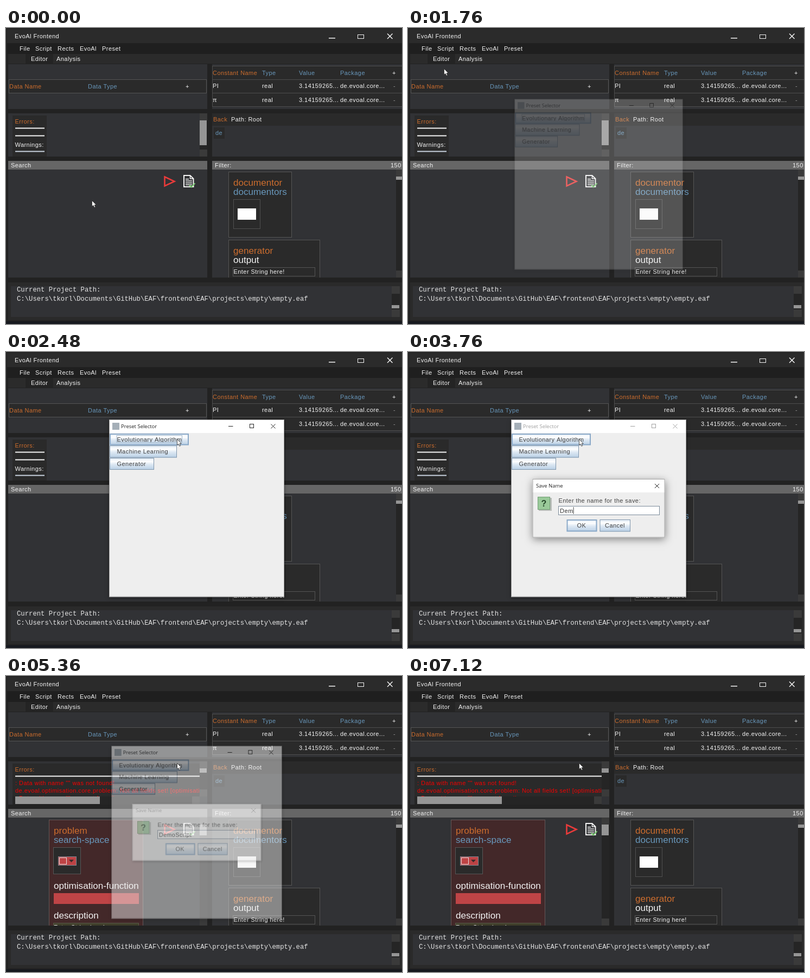
An HTML page with a canvas that plays this animation: 730 px wide and 548 px high, repeating every 7200 ms.

```html
<!DOCTYPE html>
<html lang="en">
<head>
<meta charset="utf-8">
<title>Preset workflow</title>
<style>
html, body { margin: 0; width: 100%; height: 100%; overflow: hidden; background: #232323; }
canvas { display: block; }
</style>
</head>
<body>
<canvas id="stage" width="730" height="548"></canvas>
<script>
const W = 730, H = 548, LOOP = 7200, STEP = 80;
const screen = document.getElementById('stage').getContext('2d');
const layer = document.createElement('canvas');
layer.width = W;
layer.height = H;
const layerCtx = layer.getContext('2d');
let c = screen;

const UI = '11px "Liberation Sans", Arial, sans-serif';
const BIG = '17.1px "Liberation Sans", Arial, sans-serif';
const MONO = '12.26px "Liberation Mono", monospace';
const CAPTION = '9.5px "Open Sans", sans-serif';
const PANEL = '#313235', DARK = '#2a2a2a', GAP = '#222222', EDGE = '#555555';
const ORANGE = '#cc6d2e', BLUE = '#6897bb', WHITE = '#f4f4f4', THUMB = '#959595', KNOB = '#3a3a3a';

// Basic drawing; boxes are given by their left, top, right and bottom edges.
function box(x, y, r, b, fill, edge, weight = 1) {
  if (fill) {
    c.fillStyle = fill;
    c.fillRect(x, y, r - x, b - y);
  }
  if (edge) {
    c.strokeStyle = edge;
    c.lineWidth = weight;
    c.strokeRect(x + weight / 2, y + weight / 2, r - x - weight, b - y - weight);
  }
}

function text(str, x, y, color = WHITE, font = UI) {
  c.font = font;
  c.letterSpacing = font === UI ? '0.45px' : '0px';
  c.fillStyle = color;
  c.fillText(str, x, y);
}

function path(points, { fill, stroke, weight = 1, close = false }) {
  c.beginPath();
  points.forEach(([x, y]) => c.lineTo(x, y));
  if (close) c.closePath();
  if (fill) {
    c.fillStyle = fill;
    c.fill();
  }
  if (stroke) {
    c.strokeStyle = stroke;
    c.lineWidth = weight;
    c.stroke();
  }
}

function clipped(x, y, r, b, draw) {
  c.save();
  c.beginPath();
  c.rect(x, y, r - x, b - y);
  c.clip();
  draw();
  c.restore();
}

function cross(x, y, r, b, color, weight = 1) {
  path([[x, y], [r, b]], { stroke: color, weight });
  path([[r, y], [x, b]], { stroke: color, weight });
}

function scrollbar(x, y, r, b, from, to, knob = 13) {
  box(x, y, r, b, '#252525');
  box(x, y, r, y + knob, KNOB);
  box(x, b - knob, r, b, KNOB);
  box(x, from, r - 1, to, THUMB);
}

// Main window
function chrome() {
  box(0, 0, W, H, GAP);
  box(2, 2, W, 28, '#2b2b2b');
  text('EvoAl Frontend', 16, 19);
  box(595, 18, 607, 19.5, WHITE);
  box(648, 12, 660, 20, null, WHITE);
  cross(703, 10.5, 712.5, 20, WHITE, 1.5);
  box(2, 28, W, 48, '#1f1f1f');
  [['File', 25], ['Script', 54], ['Rects', 95], ['EvoAl', 136], ['Preset', 177]]
    .forEach(([label, x]) => text(label, x, 42));
  box(4, 48, W, 66, '#2b2b2b');
  box(36, 48, 87, 66, '#242424');
  text('Editor', 46, 61);
  text('Analysis', 93, 61);
}

function tables() {
  box(4, 67, 371, 150, PANEL);
  box(5, 95, 370, 121, DARK, EDGE);
  text('Data Name', 6, 112, ORANGE);
  text('Data Type', 151, 112, BLUE);
  text('+', 331, 112);

  box(380, 67, W, 150, PANEL);
  [70, 95, 120].forEach(y => box(380, y, W + 2, y + 26, DARK, '#4e4e4e'));
  text('Constant Name', 381, 87, ORANGE);
  text('Type', 472, 87, BLUE);
  text('Value', 540, 87, BLUE);
  text('Package', 616, 87, BLUE);
  text('+', 712, 87);
  ['PI', 'π'].forEach((name, i) => {
    const y = 111 + i * 26;
    text(name, 381, y);
    text('real', 472, y);
    text('3.14159265...', 540, y);
    text('de.evoal.core...', 616, y);
    text('-', 714, y, '#999999');
  });

  box(380, 158, W, 238, PANEL);
  box(380, 158, W, 181, DARK);
  text('Back', 382, 173, ORANGE);
  text('Path: Root', 415, 173);
  box(383, 184, 403, 205, DARK);
  text('de', 386, 198, BLUE);
}

function messages(failed) {
  box(4, 158, 371, 238, PANEL);
  if (!failed) {
    box(12, 162, 75, 238, DARK);
    text('Errors:', 16.5, 177, ORANGE);
    text('Warnings:', 16.5, 220);
    [184.5, 198.5, 227.5].forEach(y => box(17, y, 71, y + 2, y > 227 ? '#c9d3e0' : WHITE));
    scrollbar(357, 158, 371, 238, 171, 217);
    return;
  }
  box(12, 162, 357, 223, DARK);
  text('Errors:', 16.5, 177, ORANGE);
  box(17, 184.5, 357, 186.5, WHITE);
  clipped(12, 187, 357, 223, () => {
    const missing = ': Data with name "" was not found!';
    text(missing, 17, 202, '#f50000');
    text('de.evoal.optimisation.core.problem: Not all fields set! [optimisation-function]', 17, 216, '#f50000');
    text(missing, 17, 230, '#f50000');
  });
  scrollbar(357, 158, 371, 223, 171, 179);
  box(12, 223, 357, 238, '#252525');
  box(17, 223, 173, 237, THUMB);
  box(343, 223, 357, 237, KNOB);
}

function icons() {
  path([[292.5, 275.5], [310.5, 284], [292.5, 292.5]], { stroke: '#e93b3b', weight: 2.6, close: true });
  path([[328, 273], [339.5, 273], [345.5, 279], [345.5, 294], [328, 294]], { stroke: WHITE, weight: 2, close: true });
  path([[339.5, 273], [339.5, 279], [345.5, 279]], { stroke: WHITE, weight: 1.5 });
  [279, 282.5, 286, 289.5].forEach((y, i) => box(331, y, i ? 343 : 337, y + 1.5, WHITE));
  path([[338, 290.5], [341.5, 294.5], [348.5, 287.5]], { stroke: '#7ccf74', weight: 2 });
}

function searchArea(failed) {
  box(4, 246, 371, 262, '#666666');
  text('Search', 9, 258);
  box(4, 262, 371, 462, PANEL);
  if (failed) {
    scrollbar(357, 262, 371, 462, 275, 295);
    clipped(4, 262, 357, 462, () => {
      box(79, 266, 253, 480, '#432829', '#665858');
      text('problem', 88, 292, ORANGE, BIG);
      text('search-space', 88, 309, BLUE, BIG);
      box(87, 317, 138, 367, DARK, '#575757');
      box(96, 334, 130, 351, '#bd4345', '#7b8894');
      box(98, 336, 112, 349, null, '#e8e1e1');
      path([[116, 340], [125, 340], [120.5, 345]], { fill: '#3b2b2b', close: true });
      text('optimisation-function', 88, 394, WHITE, BIG);
      box(88, 402, 245, 422, '#bf4446');
      text('description', 88, 449, WHITE, BIG);
      box(87, 457, 245, 475, '#403f2b', '#5a5a48');
      text('Enter String here!', 88, 469);
    });
  }
  icons();
}

function filterArea() {
  box(380, 246, W, 262, '#666666');
  text('Filter:', 385, 258);
  text('150', 709, 258);
  box(380, 262, W, 462, PANEL);
  scrollbar(719, 262, W + 1, 462, 275, 281);
  clipped(380, 262, 719, 462, () => {
    box(410, 266, 527, 388, DARK, EDGE);
    text('documentor', 419, 292, ORANGE, BIG);
    text('documentors', 419, 309, BLUE, BIG);
    box(419, 317, 469, 372, DARK, '#505050');
    box(427, 334, 461, 355, '#ffffff');
    box(410, 392, 579, 480, DARK, EDGE);
    text('generator', 419, 418, ORANGE, BIG);
    text('output', 419, 435, WHITE, BIG);
    box(418, 443, 570, 460, DARK, EDGE);
    text('Enter String here!', 419.5, 455);
  });
}

function consoleArea() {
  box(4, 471, W, 541, '#2a2a2a');
  box(9, 478, 711, 535, PANEL);
  scrollbar(711, 478, 726, 535, 513, 519, 14);
  text('Current Project Path:', 20, 488, '#e4e4e4', MONO);
  text('C:\\Users\\tkorl\\Documents\\GitHub\\EAF\\frontend\\EAF\\projects\\empty\\empty.eaf', 20, 504.5, '#e4e4e4', MONO);
  box(0, 543, W, H, '#17191f');
}

function fileMenu(hovered) {
  box(20, 29, 49, 48, '#a3b8cc', '#7a8a99');
  text('File', 25, 42, '#333333');
  box(20, 47, 166, 191, '#eeeeee', '#8ba3bd');
  if (hovered) box(21, 67, 165, 85, '#a3b8cc');
  ['new', 'new from preset', 'open recent', 'open ...', 'save as ...', 'save', 'import ...', 'add generator to project']
    .forEach((label, i) => text(label, 26, 62 + i * 17.5, '#404040'));
  path([[157, 90], [161, 93.5], [157, 97]], { fill: '#333333', close: true });
}

// Light dialogs
const titleInk = active => active ? '#222222' : '#a0a0a0';

function button(label, x, y, r, b, labelX, weight = 1) {
  const shade = c.createLinearGradient(0, y, 0, b);
  [[0, '#dde8f3'], [0.3, '#ffffff'], [0.55, '#dde8f3'], [1, '#b8cfe5']]
    .forEach(([stop, color]) => shade.addColorStop(stop, color));
  box(x, y, r, b, shade, weight > 1 ? '#8ba9c8' : '#7f95ab', weight);
  text(label, labelX, (y + b) / 2 + 4, '#404040');
}

function frame(x, y, r, b, barBottom, blur) {
  c.save();
  c.shadowColor = 'rgba(0,0,0,0.45)';
  c.shadowBlur = blur;
  c.shadowOffsetY = blur / 4;
  box(x, y, r, b, '#eeeeee');
  c.restore();
  box(x, y, r, barBottom, '#ffffff');
  box(x, y, r, b, null, '#a5a5a5');
}

function presetWindow(active, focused) {
  const ink = titleInk(active);
  frame(190, 125, 513, 453.5, 150, 6);
  box(196, 131, 209, 144, '#a5afb8');
  text('Preset Selector', 212, 141, ink, CAPTION);
  box(410, 137, 418.5, 138, ink);
  box(449, 133, 457, 141, null, ink);
  cross(488.5, 133.5, 496.5, 141.5, ink);
  button('Evolutionary Algorithm', 191, 151, 337, 172.5, 204.5, 2);
  button('Machine Learning', 191, 173, 315, 195.5, 204.5);
  button('Generator', 191, 196, 273, 218, 204.5);
  if (focused) box(203.5, 154, 325, 168, null, '#a3b8cc');
}

function saveDialog(name, active) {
  const ink = titleInk(active);
  frame(229.5, 235, 473.5, 343.5, 260, active ? 14 : 4);
  text('Save Name', 236, 251, ink, CAPTION);
  cross(455, 244, 463, 252, ink);
  box(241, 270, 265, 294, '#b9bdb9');
  box(239, 268, 262, 292, '#9aca9a', '#6f9d72');
  text('?', 245.5, 285.5, '#25482a', 'bold 16px "Liberation Sans", Arial, sans-serif');
  text('Enter the name for the save:', 277.5, 279, '#404040');
  box(277, 285, 464, 302, '#ffffff', '#7a8a99');
  text(name, 280, 298, '#333333');
  if (active) {
    const x = 280 + c.measureText(name).width;
    box(x, 287, x + 1, 300, '#444444');
  }
  button('OK', 292.5, 310, 348.5, 332.5, 311.5, 2);
  button('Cancel', 353.5, 310, 410, 332.5, 363);
}

// Draws a dialog as one group, scaled about its centre and faded.
function popup(visibility, cx, cy, draw) {
  if (visibility <= 0) return;
  layerCtx.clearRect(0, 0, W, H);
  c = layerCtx;
  draw();
  c = screen;
  const scale = 0.95 + 0.05 * visibility;
  c.save();
  c.globalAlpha = visibility;
  c.translate(cx, cy);
  c.scale(scale, scale);
  c.drawImage(layer, -cx, -cy);
  c.restore();
}

function pointer([x, y]) {
  const shape = [[0, 0], [0, 11], [2.5, 8.8], [4.3, 12.8], [6.2, 12], [4.5, 8.2], [7.8, 8]];
  path(shape.map(([dx, dy]) => [x + 0.5 + dx, y + 0.5 + dy]),
    { fill: '#ffffff', stroke: '#2c2c2c', weight: 0.8, close: true });
}

// Timing
const clamp = v => Math.min(1, Math.max(0, v));
const FADE = 240, ACCEPT = 5200, CLOSED = 5475;
const moves = [[80, 158, 319], [880, 33, 38], [1040, 33, 38], [1200, 45, 51], [1520, 66, 75], [1840, 66, 75], [2400, 315, 161]];
const keyTimes = [3280, 3440, 3600, 3840, 4080, 4240, 4480, 4720, 4800, 5040];

function pointerAt(t) {
  const next = moves.findIndex(([time]) => time > t);
  if (next === 0) return moves[0].slice(1);
  if (next < 0) return moves[moves.length - 1].slice(1);
  const [t0, x0, y0] = moves[next - 1], [t1, x1, y1] = moves[next];
  const p = (t - t0) / (t1 - t0), eased = p * p * (3 - 2 * p);
  return [x0 + (x1 - x0) * eased, y0 + (y1 - y0) * eased];
}

function fade(t, opens) {
  return Math.min(clamp((t - opens) / FADE), clamp((CLOSED - t) / FADE));
}

function draw(t) {
  const failed = t > ACCEPT, asking = t >= 2720 && t < ACCEPT;
  const at = pointerAt(t);
  chrome();
  tables();
  messages(failed);
  searchArea(failed);
  filterArea();
  consoleArea();
  if (t >= 960 && t < 1640) fileMenu(at[1] > 67);
  popup(fade(t, 1707), 351.5, 289, () => presetWindow(!asking, t < 2720));
  const name = 'DemoScript'.slice(0, keyTimes.filter(k => k <= t).length);
  popup(fade(t, 2720), 351.5, 289, () => saveDialog(name, asking));
  pointer(at);
}

function tick() {
  draw(Math.floor((performance.now() % LOOP) / STEP) * STEP);
  requestAnimationFrame(tick);
}
tick();
</script>
</body>
</html>
```
